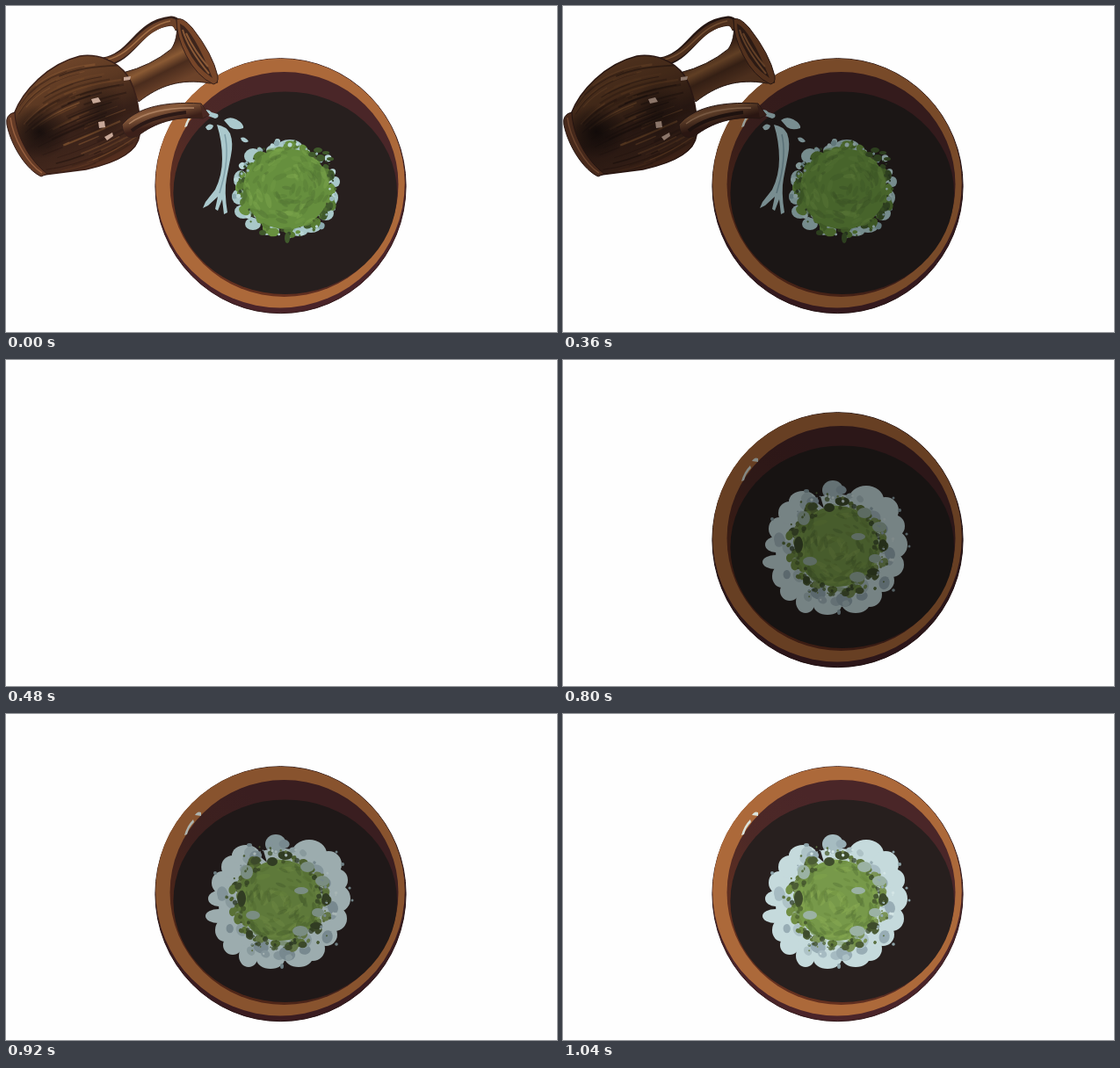
An HTML page for the animation above (1160 ms loop, 627x371 px).

```html
<!DOCTYPE html>
<html lang="en">
<head>
<meta charset="utf-8">
<title>Pouring water into a bowl</title>
<style>
html, body { margin: 0; width: 100%; height: 100%; overflow: hidden; background: #fefefe; }
svg { display: block; width: 627px; height: 371px; }
</style>
</head>
<body>
<svg id="stage" viewBox="0 0 627 371">
  <defs>
    <linearGradient id="wall" x1="0" y1=".6" x2=".4" y2=".1">
      <stop offset="0" stop-color="#64301f"/><stop offset=".5" stop-color="#4d2926"/><stop offset="1" stop-color="#4a2628"/>
    </linearGradient>
    <linearGradient id="clay" gradientUnits="userSpaceOnUse" x1="50" y1="65" x2="100" y2="188">
      <stop offset="0" stop-color="#70462a"/><stop offset=".3" stop-color="#5b3822"/>
      <stop offset=".6" stop-color="#362018"/><stop offset=".85" stop-color="#42271c"/><stop offset="1" stop-color="#5c3220"/>
    </linearGradient>
    <linearGradient id="neck" gradientUnits="userSpaceOnUse" x1="160" y1="55" x2="180" y2="95">
      <stop offset="0" stop-color="#4a2b1d"/><stop offset=".35" stop-color="#8a5a34"/>
      <stop offset=".6" stop-color="#4a2c1d"/><stop offset="1" stop-color="#6d432a"/>
    </linearGradient>
    <linearGradient id="spout" gradientUnits="userSpaceOnUse" x1="172" y1="111" x2="178" y2="134">
      <stop offset="0" stop-color="#6b402a"/><stop offset=".35" stop-color="#8a5c3c"/><stop offset="1" stop-color="#3c2019"/>
    </linearGradient>
    <radialGradient id="shade"><stop offset="0" stop-color="#180f0d"/><stop offset="1" stop-color="#180f0d" stop-opacity="0"/></radialGradient>
    <path id="body" d="M9 123C19 96 48 66 84 57C104 54 126 62 138 79C149 96 154 126 152 147C150 164 132 177 91 186L44 192C24 178 10 150 9 123Z"/>
    <clipPath id="inBody"><use href="#body"/></clipPath>
  </defs>

  <g id="bowl">
    <ellipse cx="312.5" cy="204.7" rx="142.6" ry="145" fill="#4a2429" stroke="#32191a"/>
    <ellipse cx="312" cy="201.6" rx="141.8" ry="141.8" fill="#ac693a"/>
    <ellipse cx="316.5" cy="203" rx="130" ry="128" fill="url(#wall)"/>
    <ellipse cx="317.7" cy="212.7" rx="127.3" ry="115.3" fill="#271f1e"/>
    <path d="M203 138Q206 127 213 120L214 123Q208 129 206 137ZM215 115Q218 110 222 112L222 116Z" fill="#dbe3dc"/>
  </g>

  <g id="foam">
    <g id="foamRing" fill="#c5dadc"></g>
    <g id="leaves"></g>
  </g>

  <g id="pour">
    <g id="clump"></g>
    <g id="water" fill="#abc9cd">
      <path d="M240 135Q251 137 255 145Q259 156 256 170L251 196Q248 211 252 235L248 237L246 220L241 233L238 231L241 217L230 227L224 230L227 223L238 209Q246 193 246 174Q246 154 240 135Z"/>
      <path d="M249 146Q254 168 247 198L243 213" fill="none" stroke="#7f9fa8" stroke-width="1.5"/>
      <path d="M248 130Q254 125 262 129Q271 134 270 139Q261 142 255 138ZM224 119Q230 116 234 121L241 123Q243 127 238 128L230 125ZM227 138Q231 132 236 136Q235 142 229 141ZM267 150Q272 148 276 154Q272 157 268 153Z"/>
    </g>
    <g id="jug">
      <path d="M111 64C146 58 149 21 188 17Q196 18 198 27" fill="none" stroke="#35201a" stroke-width="11"/>
      <path d="M112 63C145 58 151 23 188 18Q194 19 196 26" fill="none" stroke="#6c4128" stroke-width="8"/>
      <path d="M116 61C147 53 153 24 187 17" fill="none" stroke="#a16e45" stroke-width="1.6"/>
      <path d="M194 15C196 31 193 42 188 49Q165 68 133 76L151 109C174 91 198 82 232 88L241 87Z" fill="url(#neck)" stroke="#34201a"/>
      <path d="M194 15Q201 12 212 25Q235 54 241 80Q242 88 236 89Q217 80 205 56Q194 35 194 15Z" fill="#774629" stroke="#37201a"/>
      <path d="M198 20Q213 27 235 82Q216 70 206 48Q198 33 198 20Z" fill="#3d251c"/>
      <path d="M201 27Q207 48 231 77M205 31Q215 52 230 69" fill="none" stroke="#8a5936" stroke-width="2"/>
      <use href="#body" fill="url(#clay)"/>
      <g clip-path="url(#inBody)">
        <g id="streaks" fill="none"></g>
        <ellipse cx="38" cy="143" rx="35" ry="31" fill="url(#shade)"/>
        <ellipse cx="108" cy="119" rx="27" ry="36" fill="url(#shade)" opacity=".5"/>
      </g>
      <use href="#body" fill="none" stroke="#3a2019" stroke-width="1.5"/>
      <path d="M10 121Q-1 123 1 135C6 160 24 187 40 194L47 191C27 176 11 148 10 121Z" fill="#653b26" stroke="#321b17"/>
      <path d="M5 127C8 151 25 180 41 190" fill="none" stroke="#986040" stroke-width="1.5"/>
      <path d="M132 135C147 117 177 108 222 111L231 124L224 128C193 125 169 133 150 148Q134 154 132 135Z" fill="url(#spout)" stroke="#35201b"/>
      <path d="M140 134C157 121 185 115 214 116" fill="none" stroke="#ad8060" stroke-width="1.5"/>
      <path d="M143 142Q163 126 205 121" fill="none" stroke="#2b1916" stroke-width="4"/>
      <path d="M221 112L232 124L224 127Z" fill="#4a2923"/>
      <g fill="#c7a898">
        <path d="M134 81l8 -1l-1 4l-7 1Z"/><path d="M97 106l8 -2l3 5l-9 2Z"/>
        <path d="M105 132l7 -1l1 7l-7 1Z"/><path d="M112 149l9 -5l1 4l-7 5Z"/>
      </g>
    </g>
  </g>
</svg>
<script>
const $ = id => document.getElementById(id);

function add(parent, tag, attrs) {
  const node = document.createElementNS('http://www.w3.org/2000/svg', tag);
  for (const key in attrs) node.setAttribute(key, attrs[key]);
  return parent.appendChild(node);
}

function seeded(seed) {
  return () => (seed = seed * 16807 % 2147483647) / 2147483647;
}

// Brush dabs scattered over a ring, laid along its circumference.
function dabs(parent, seed, count, { x, y, from, to, size, colors, opacity = 1, stretch = 1, squash = 1 }) {
  const rnd = seeded(seed);
  for (let i = 0; i < count; i++) {
    const angle = rnd() * 2 * Math.PI;
    const r = Math.sqrt(from * from + rnd() * (to * to - from * from));
    const cx = x + r * Math.cos(angle), cy = y + r * squash * Math.sin(angle);
    const s = size * (.45 + rnd() * .8);
    const turn = angle * 180 / Math.PI + 90 + (rnd() - .5) * 70;
    add(parent, 'ellipse', {
      rx: s * stretch, ry: s, opacity, fill: colors[Math.floor(rnd() * colors.length)],
      transform: `translate(${cx} ${cy}) rotate(${turn})`
    });
  }
}

function lobes(parent, list, fill) {
  for (const [cx, cy, rx, ry = rx] of list) add(parent, 'ellipse', { cx, cy, rx, ry, fill });
}

function drawStreaks() {
  const rnd = seeded(91);
  const mix = (a, b, t) => a + (b - a) * t;
  const colors = ['#8a5a34', '#2a1813', '#20130f', '#714728', '#382116'];
  for (let i = 0; i < 75; i++) {
    const t = rnd();
    const start = `${mix(10, 44, t)} ${mix(122, 192, t)}`;
    const bend = `${mix(36, 102, t)} ${mix(66, 190, t)}`;
    const end = `${mix(126, 154, t)} ${mix(65, 150, t)}`;
    add($('streaks'), 'path', {
      d: `M${start}Q${bend} ${end}`, stroke: colors[i % 5], 'stroke-width': .6 + rnd() * 1.8,
      opacity: .3 + rnd() * .35, pathLength: 100,
      'stroke-dasharray': `${20 + rnd() * 45} 200`, 'stroke-dashoffset': -rnd() * 60
    });
  }
}

function drawClump() {
  const g = $('clump'), at = { x: 319, y: 208, squash: .95 };
  lobes(g, [[281, 171, 10, 9], [267, 197, 8, 10], [265, 217, 8, 9], [270, 234, 10, 8], [281, 248, 9, 7],
    [302, 255, 9, 6], [323, 160, 14, 8], [305, 164, 9, 6], [347, 250, 12, 8], [364, 236, 9, 8],
    [371, 218, 7, 9], [375, 200, 5, 6], [333, 257, 10, 5]], '#a9c8c9');
  dabs(g, 17, 38, { ...at, from: 47, to: 60, size: 3.5, colors: ['#b9d6d6', '#8cabb0', '#a9c8c9'] });
  dabs(g, 5, 80, { ...at, from: 42, to: 56, size: 4, stretch: 1.4, colors: ['#587c35', '#68903f', '#405a2c'] });
  add(g, 'ellipse', { cx: 319, cy: 208, rx: 49, ry: 46, fill: '#668f3e' });
  dabs(g, 23, 120, { ...at, from: 0, to: 49, size: 2.6, stretch: 2.7, opacity: .45,
    colors: ['#7fa94e', '#567d35', '#719b45', '#4f7132'] });
  dabs(g, 43, 28, { ...at, from: 49, to: 59, size: 1.9, colors: ['#35482a', '#4b692f'] });
  lobes(g, [[355, 164, 5, 3], [364, 167, 4, 2], [369, 174, 4, 2], [358, 173, 5, 4], [349, 169, 5, 3],
    [320, 264, 3, 6], [292, 258, 4, 3]], '#405a2c');
  dabs(g, 77, 18, { ...at, from: 48, to: 58, size: 2.2, colors: ['#b9d6d6', '#9bbabd'] });
}

function drawFoam() {
  const ring = $('foamRing'), g = $('leaves'), at = { x: 312, y: 213 };
  add(ring, 'ellipse', { cx: 312, cy: 217, rx: 70, ry: 64 });
  lobes(ring, [[345, 159, 20, 16], [367, 171, 15, 15], [376, 189, 13], [379, 210, 13, 15], [374, 233, 14],
    [364, 251, 13], [349, 267, 14], [333, 277, 16, 11], [301, 279, 16, 11], [276, 275, 11, 13],
    [258, 263, 11], [249, 246, 11, 13], [242, 230, 15, 8], [242, 210, 12, 9], [246, 192, 12, 13],
    [258, 174, 13], [273, 161, 16, 12]], '#c5dadc');
  add(ring, 'path', { d: 'M291 149L297 169L289 162Z', fill: '#271f1e' });
  lobes(ring, [[307, 148, 12, 11]], '#a6bcc1');
  dabs(ring, 31, 30, { ...at, from: 52, to: 68, size: 6.5, stretch: 1.25, colors: ['#98adb5', '#a6bbc2', '#aec3c7'] });
  dabs(g, 12, 90, { ...at, from: 42, to: 56, size: 3.8, stretch: 1.3, colors: ['#60783c', '#728f45', '#4c5d35', '#7b9458'] });
  add(g, 'ellipse', { cx: 312, cy: 212, rx: 47, ry: 46, fill: '#77994a' });
  dabs(g, 61, 135, { ...at, from: 0, to: 49, size: 2.4, stretch: 3, opacity: .45,
    colors: ['#8bad54', '#65853c', '#80a34c', '#577337'] });
  dabs(g, 99, 55, { ...at, from: 42, to: 56, size: 2.4, opacity: .75, colors: ['#34432a', '#4b602f', '#3d4e2b'] });
  lobes(g, [[318, 161, 8, 5], [303, 168, 6, 5], [268, 210, 5, 9], [364, 211, 5, 7], [277, 250, 4], [353, 241, 7, 4]], '#3e4c2c');
  lobes(g, [[281, 229, 8, 5], [335, 247, 9, 6], [336, 201, 8, 4], [343, 174, 8, 6], [274, 180, 7, 8],
    [360, 190, 8, 6], [355, 226, 7, 5]], '#9bb2a4');
  dabs(g, 8, 55, { ...at, from: 52, to: 66, size: 1.6, colors: ['#d3e5e5', '#71864d', '#94aab0', '#5a7040'] });
  lobes(g, [[376, 157, 1.5], [383, 171, 2], [391, 198, 1.6], [394, 212, 1.5], [376, 262, 1.8],
    [238, 181, 2], [277, 149, 3, 2], [314, 287, 2, 3]], '#8ca2a8');
}

drawStreaks();
drawClump();
drawFoam();

// Time in ms, brightness, visible layer.
const period = 1160;
const steps = [
  [0, 1, 'pour'], [360, .7, 'pour'], [480, 1, ''],
  [800, .6, 'foam'], [920, .79, 'foam'], [1040, 1, 'foam'], [period, 1, 'foam']
];

function play(node, style) {
  const frames = steps.map(([time, light, layer]) =>
    ({ offset: time / period, easing: 'steps(1, end)', ...style(light, layer) }));
  node.animate(frames, { duration: period, iterations: Infinity }).startTime = 0;
}

play($('stage'), (light, layer) => ({ filter: `brightness(${light})`, opacity: layer ? 1 : 0 }));
for (const id of ['pour', 'foam'])
  play($(id), (light, layer) => ({ opacity: layer === id ? 1 : 0 }));
</script>
</body>
</html>
```
